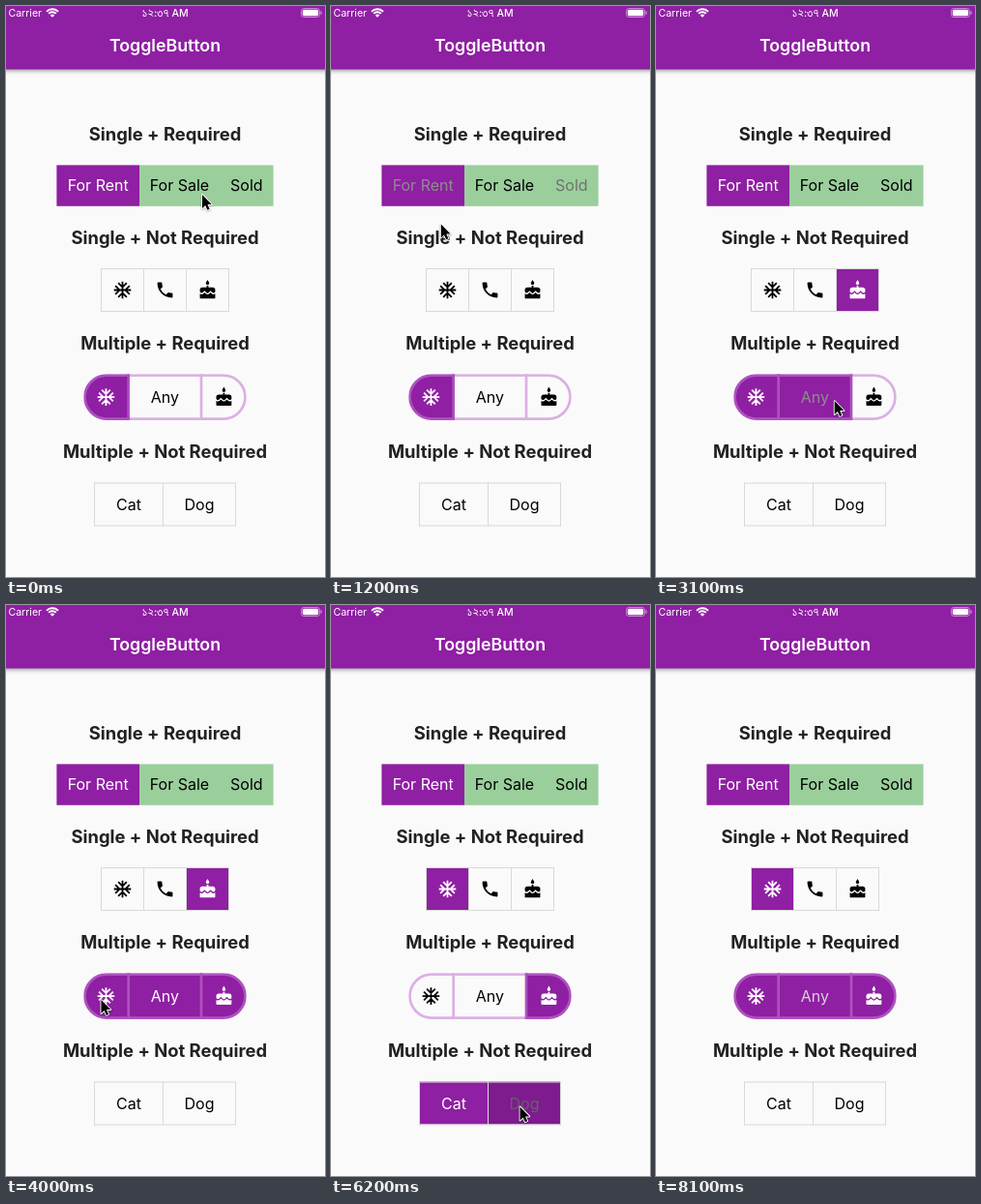
An HTML page with a canvas that plays this animation: 330x590 px, repeating every 9 s.

```html
<!DOCTYPE html>
<html lang="en">
<head>
<meta charset="utf-8">
<title>ToggleButton</title>
<style>
html, body { margin: 0; width: 100%; height: 100%; overflow: hidden; background: #fafafa; }
canvas { display: block; width: 330px; height: 590px; }
</style>
</head>
<body>
<canvas id="stage"></canvas>
<script>
const W = 330, H = 590, MID = 164.5;
const LOOP = 9000, STEP = 100, END = 8100;
const CADENCE = 450, MOVE = 300, FADE = 180, PRESS = 100;
const FONT = 'Inter, Roboto, "Noto Sans", "Noto Sans Bengali", sans-serif';
const PURPLE = '#8f1fa3', GREEN = '#9acf9c', PAPER = '#fafafa', GRID = '#d9d9d9';
const RING = '#dbb0e3', RING_ON = '#ad52bf', RING_W = 2.7;

const canvas = document.getElementById('stage');
const g = canvas.getContext('2d');
const dpr = window.devicePixelRatio || 1;
canvas.width = W * dpr;
canvas.height = H * dpr;

const rows = [
  { title: 'Single + Required', ty: 132, y: 164.4, h: 42.4, edges: [52.4, 138, 221, 276.6],
    items: ['For Rent', 'For Sale', 'Sold'], on: [0], single: true, style: 'flat' },
  { title: 'Single + Not Required', ty: 239, y: 271, h: 44, edges: [98, 142, 186, 230],
    items: ['snow', 'phone', 'cake'], on: [], single: true, style: 'grid' },
  { title: 'Multiple + Required', ty: 348, y: 380.3, h: 47.6, edges: [80.2, 126.7, 202, 248.8],
    items: ['snow', 'Any', 'cake'], on: [0], style: 'pill' },
  { title: 'Multiple + Not Required', ty: 460, y: 492.5, h: 44, edges: [91, 162, 237],
    items: ['Cat', 'Dog'], on: [], style: 'grid' }
];

// Visits to a row: buttons are clicked in order at a fixed cadence
const visits = [
  { at: 200, row: 0, picks: [1, 2, 0], dx: 13 },
  { at: 1600, row: 1, picks: [0, 1, 2], dx: 5 },
  { at: 3000, row: 2, picks: [1, 2], dx: 0 },
  { at: 4100, row: 2, picks: [0, 1], dx: -5 },
  { at: 4900, row: 1, picks: [1, 0], dx: 1 },
  { at: 5680, row: 3, picks: [0, 1, 1, 0], dx: -4 },
  { at: 7500, row: 2, picks: [0, 1], dx: 0 }
];

const clicks = visits.flatMap(v => v.picks.map((i, n) => {
  const r = rows[v.row];
  const x = (r.edges[i] + r.edges[i + 1]) / 2 + v.dx;
  return { at: v.at + n * CADENCE, row: v.row, i, x, y: r.y + r.h / 2 + 4 };
}));
const stops = [{ at: 0, x: 203, y: 195 }, ...clicks];

// Icons on a 24 unit grid
const icons = {
  snow: new Path2D(),
  phone: new Path2D('M3 4q0-1 1-1h3.5q1 0 1 1 0 1.9.6 3.6.2.6-.3 1L6.6 10.8q2.2 4.4 6.6 6.6l2.2-2.2q.4-.4 1-.3 1.7.6 3.6.6 1 0 1 1V20q0 1-1 1A17 17 0 0 1 3 4z'),
  cake: new Path2D('M12 0l1.7 3a2 2 0 1 1-3.4 0z' +
    'M13 9V7h-2v2H6a3 3 0 0 0-3 3v1.5a2 2 0 0 0 3.3 1.4l2.2-2.1 2.1 2.1a2 2 0 0 0 2.8 0l2.1-2.1 2.2 2.1A2 2 0 0 0 21 13.5V12a3 3 0 0 0-3-3z' +
    'M3 16.4V21a1 1 0 0 0 1 1h16a1 1 0 0 0 1-1v-4.6q-2.4 1.4-4.4-.4l-1.1-1.1-1.1 1.1a3.4 3.4 0 0 1-4.8 0l-1.1-1.1-1.1 1.1q-2 1.8-4.4.4z')
};
const arm = new Path2D('M0 0V-10M-4.95-8.36L0-3.41 4.95-8.36');
for (let a = 0; a < 360; a += 90) {
  icons.snow.addPath(arm, new DOMMatrix().translate(12, 12).rotate(a));
}
const arrow = new Path2D('M0 0V14L3.2 11 5.4 15.8 7.6 14.8 5.5 10H9.8z');

const mix = (a, b, k) => a + (b - a) * k;

// The pointer leaves right after a click and waits at the next button
function pointerAt(t) {
  const last = stops.findLastIndex(s => s.at <= t);
  const a = stops[last], b = stops[last + 1] || a;
  const k = Math.min(1, (t - a.at) / MOVE);
  return [mix(a.x, b.x, k), mix(a.y, b.y, k)];
}

function stateAt(t) {
  const state = rows.map(r => r.items.map((_, i) => ({ on: r.on.includes(i), at: -LOOP, press: false })));
  const set = (b, on, at) => { if (b.on !== on) { b.on = on; b.at = at; } };
  for (const { at, row, i } of clicks) {
    const btns = state[row], b = btns[i];
    if (Math.abs(t - at) < PRESS) b.press = true;
    if (at > t) continue;
    if (rows[row].single) btns.forEach((o, j) => set(o, j === i, at));
    else set(b, !b.on, at);
  }
  return state;
}

function text(str, x, y, size, weight, color, align = 'center') {
  g.font = `${weight} ${size}px ${FONT}`;
  g.textAlign = align;
  g.textBaseline = 'alphabetic';
  g.fillStyle = color;
  g.fillText(str, x, y + size * 0.364);
}

function box(x, y, w, h, color) {
  g.fillStyle = color;
  g.fillRect(x, y, w, h);
}

function round(x, y, w, h, rad) {
  g.beginPath();
  g.roundRect(x, y, w, h, rad);
}

function icon(name, x, y, color) {
  g.save();
  g.translate(x, y);
  g.scale(0.88, 0.88);
  g.translate(-12, -12);
  g.fillStyle = g.strokeStyle = color;
  g.lineWidth = 2;
  if (name === 'snow') g.stroke(icons.snow);
  else g.fill(icons[name]);
  g.restore();
}

function label(name, b, x, y, t) {
  if (icons[name]) return icon(name, x, y, b.on ? '#fff' : '#000');
  const k = Math.min(1, (t - b.at) / FADE);
  const v = Math.round(255 * (b.on ? k : 1 - k));
  text(name, x, y, 16, 400, `rgb(${v},${v},${v})`);
}

function pill(r) {
  const x = r.edges[0], d = RING_W / 2;
  round(x + d, r.y + d, r.edges[3] - x - RING_W, r.h - RING_W, r.h / 2 - d);
}

function gridLines({ edges: e, y, h }) {
  const x = e[0], w = e[e.length - 1] - x + 1;
  e.forEach(v => box(v, y, 1, h + 1, GRID));
  box(x, y, w, 1, GRID);
  box(x, y + h, w, 1, GRID);
}

function pillLines(r, btns) {
  const e = r.edges;
  g.lineWidth = RING_W;
  btns.forEach((b, i) => {
    g.save();
    g.beginPath();
    g.rect(e[i], r.y, e[i + 1] - e[i], r.h);
    g.clip();
    pill(r);
    g.strokeStyle = b.on ? RING_ON : RING;
    g.stroke();
    g.restore();
  });
  for (let i = 1; i < btns.length; i++) {
    const on = btns[i].on || btns[i - 1].on;
    box(e[i] - RING_W / 2, r.y, RING_W, r.h, on ? RING_ON : RING);
  }
}

function drawRow(r, btns, t) {
  const e = r.edges, shift = r.style === 'grid' ? 0.5 : 0;
  text(r.title, MID, r.ty, 18.4, 700, '#212121');
  g.save();
  if (r.style === 'pill') { pill(r); g.clip(); }
  btns.forEach((b, i) => {
    const w = e[i + 1] - e[i];
    if (b.on) box(e[i], r.y, w, r.h, PURPLE);
    else if (r.style === 'flat') box(e[i], r.y, w, r.h, GREEN);
    if (b.press) box(e[i], r.y, w, r.h, 'rgba(0,0,0,.12)');
  });
  g.restore();
  if (r.style === 'grid') gridLines(r);
  if (r.style === 'pill') pillLines(r, btns);
  btns.forEach((b, i) => {
    label(r.items[i], b, (e[i] + e[i + 1]) / 2 + shift, r.y + r.h / 2 + shift, t);
  });
}

function drawBar() {
  g.save();
  g.shadowColor = 'rgba(0,0,0,.45)';
  g.shadowBlur = 5 * dpr;
  g.shadowOffsetY = 1.5 * dpr;
  box(-10, -10, W + 20, 75.5, PURPLE);
  g.restore();
  text('ToggleButton', MID, 41, 17.8, 600, '#fff');
  text('Carrier', 2.4, 7, 10.6, 400, '#fff', 'left');
  text('১২:৩৭ AM', MID, 7, 10.6, 500, '#fff');

  // Signal
  const from = -Math.PI * 0.76, to = -Math.PI * 0.24;
  g.strokeStyle = g.fillStyle = '#fff';
  g.lineWidth = 1.9;
  for (const rad of [5.2, 8.2]) {
    g.beginPath();
    g.arc(48, 11.5, rad, from, to);
    g.stroke();
  }
  g.beginPath();
  g.moveTo(48, 11.8);
  g.arc(48, 11.8, 3, from, to);
  g.fill();

  // Battery
  g.globalAlpha = 0.5;
  g.lineWidth = 0.9;
  round(305.5, 2.5, 19, 9, 2.6);
  g.stroke();
  round(325.4, 5.2, 1.3, 3.6, 0.6);
  g.fill();
  g.globalAlpha = 1;
  round(306.8, 3.8, 16.4, 6.4, 1.6);
  g.fill();
}

function drawPointer(t) {
  g.save();
  g.translate(...pointerAt(t));
  g.shadowColor = 'rgba(0,0,0,.3)';
  g.shadowBlur = 2 * dpr;
  g.shadowOffsetY = dpr;
  g.lineJoin = 'round';
  g.lineWidth = 1.8;
  g.strokeStyle = '#fff';
  g.stroke(arrow);
  g.shadowColor = 'transparent';
  g.fillStyle = '#000';
  g.fill(arrow);
  g.restore();
}

function draw(ms) {
  const t = Math.min(END, Math.floor((ms % LOOP) / STEP) * STEP);
  const state = stateAt(t);
  g.setTransform(dpr, 0, 0, dpr, 0, 0);
  box(0, 0, W, H, PAPER);
  drawBar();
  rows.forEach((r, i) => drawRow(r, state[i], t));
  if (t < END) drawPointer(t);
}

const start = performance.now();
function tick() {
  draw(performance.now() - start);
  requestAnimationFrame(tick);
}
tick();
</script>
</body>
</html>
```
